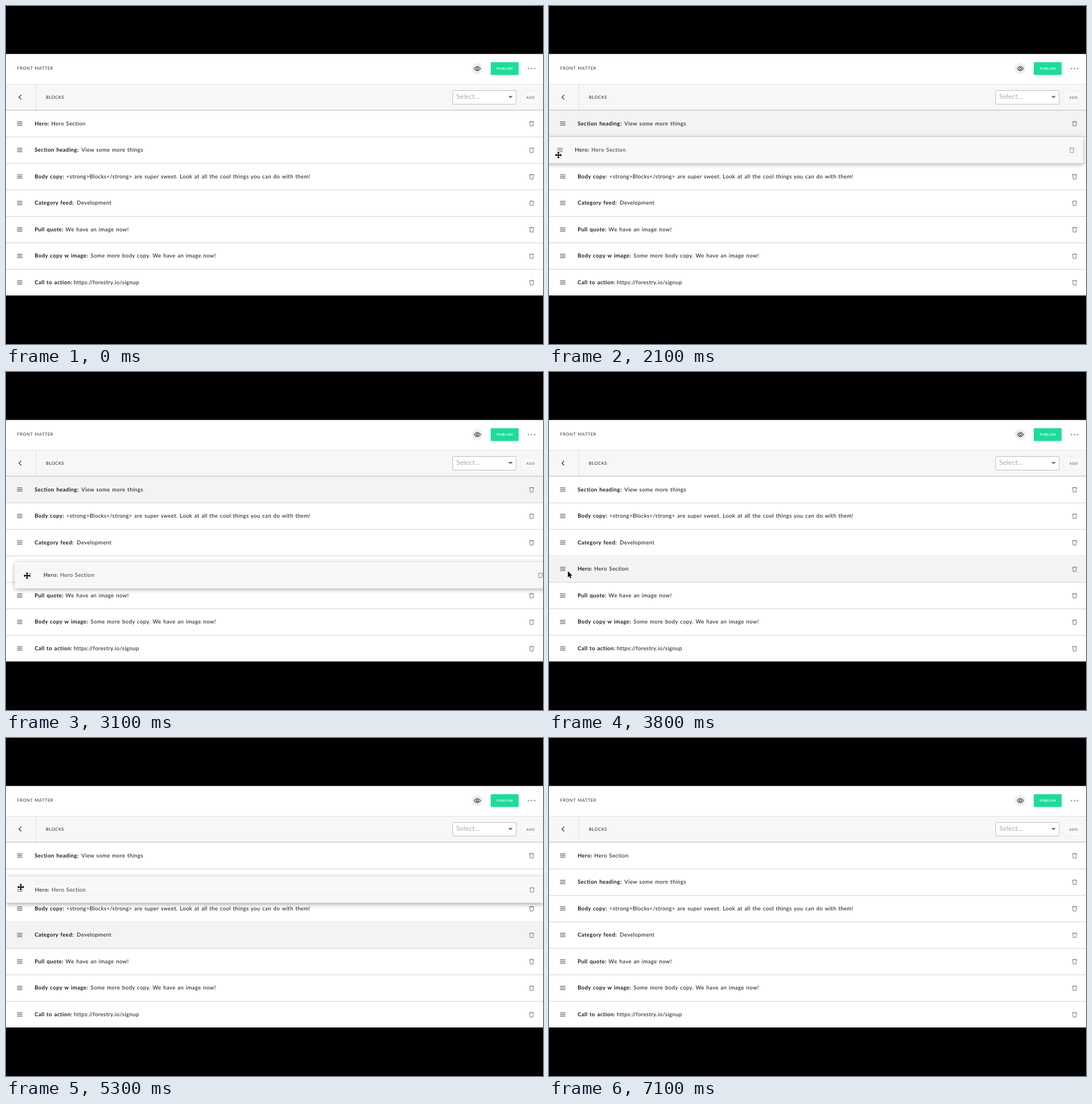
These frames come from a looping animation (943 px wide and 594 px high, 7400 ms). An HTML page with a canvas:

```html
<!DOCTYPE html>
<html lang="en">
<head>
<meta charset="utf-8">
<title>Sortable blocks</title>
<style>
html, body { margin: 0; width: 100%; height: 100%; overflow: hidden; background: #000; }
canvas { display: block; }
</style>
</head>
<body>
<canvas id="stage" width="943" height="594"></canvas>
<script>
const ctx = document.getElementById('stage').getContext('2d');
const W = 943, H = 594, LOOP = 7400, STEP = 100;
const TOP = 183.5, PITCH = 46.55;
const FONT = 'Lato, "Open Sans", sans-serif';

// label, value, x of the value
const hero = ['Hero:', 'Hero Section', 79.5];
const others = [
  ['Section heading:', 'View some more things', 132.3],
  ['Body copy:', '<strong>Blocks</strong> are super sweet. Look at all the cool things you can do with them!', 106],
  ['Category feed:', 'Development', 124.3],
  ['Pull quote:', 'We have an image now!', 104.6],
  ['Body copy w image:', 'Some more body copy. We have an image now!', 148.6],
  ['Call to action:', 'https://forestry.io/signup', 119]
];

// time, x, y
const pointerKeys = [
  [900, -15, 258], [1500, 22, 207], [1900, 22, 207], [2000, 19, 236], [2100, 16.5, 262],
  [2600, 23.5, 308], [3100, 37, 358], [3400, 33, 350], [3900, 33, 350], [4300, 10, 354],
  [4700, 25, 348], [5000, 25, 348], [5300, 26, 262], [5500, 26, 204], [5600, 26, 200],
  [5700, 25.5, 202.5], [5900, 25.5, 202.5], [6300, -18, 214]
];
// time, offset of the lifted row from the first slot
const drags = [
  { from: 1900, to: 3400, hover: 0,
    keys: [[1900, 0, 0], [2000, -3, 21], [2100, -5, 46.5], [2600, 1, 100], [3100, 15.5, 150.5], [3400, 9, 144]] },
  { from: 5000, to: 5900, hover: 3,
    keys: [[5000, 0, 3 * PITCH], [5300, 0.5, 60], [5500, 0, -2], [5600, 0, -8], [5700, -0.5, -10]] }
];

function at(keys, t) {
  const i = keys.findIndex(k => k[0] > t);
  if (i < 0) return keys[keys.length - 1].slice(1);
  if (i === 0) return keys[0].slice(1);
  const a = keys[i - 1], b = keys[i], u = (t - a[0]) / (b[0] - a[0]);
  return [a[1] + (b[1] - a[1]) * u, a[2] + (b[2] - a[2]) * u];
}

function rect(x, y, w, h, color) {
  ctx.fillStyle = color;
  ctx.fillRect(x, y, w, h);
}

function path(points, close) {
  ctx.beginPath();
  points.forEach(([x, y]) => ctx.lineTo(x, y));
  if (close) ctx.closePath();
}

function stroke(color, width) {
  ctx.strokeStyle = color;
  ctx.lineWidth = width;
  ctx.stroke();
}

function disc(x, y, r, color) {
  ctx.beginPath();
  ctx.arc(x, y, r, 0, Math.PI * 2);
  ctx.fillStyle = color;
  ctx.fill();
}

function box(x, y, w, h, r, fill, line) {
  ctx.beginPath();
  ctx.roundRect(x, y, w, h, r);
  ctx.fillStyle = fill;
  ctx.fill();
  stroke(line, 1);
}

function text(str, x, y, size, weight, color, spacing, gap = 0) {
  ctx.font = `${weight} ${size}px ${FONT}`;
  ctx.textRendering = 'geometricPrecision';
  ctx.letterSpacing = spacing + 'px';
  ctx.wordSpacing = gap + 'px';
  ctx.fillStyle = color;
  ctx.fillText(str, x, y);
}

function trash(x, y) {
  path([[x - 4.2, y - 3.3], [x + 4.2, y - 3.3]]);
  stroke('#777', 1.1);
  path([[x - 3.3, y - 3], [x - 2.6, y + 4.2], [x + 2.6, y + 4.2], [x + 3.3, y - 3]]);
  stroke('#777', 1);
  path([[x - 1.5, y - 4.4], [x + 1.5, y - 4.4]]);
  stroke('#999', 0.8);
}

function rowContent([label, value, valueX], y) {
  const mid = y + 23;
  for (const d of [-2.9, 0, 2.9]) rect(19.4, mid + d - 0.6, 9.3, 1.2, '#5a5a5a');
  text(label, 50.2, mid + 3.1, 9.6, 700, '#1c1c1c', 0.4, 0.8);
  text(value, valueX, mid + 3.1, 9.6, 500, '#222', 0.36, 0.8);
  trash(923, mid + 0.3);
}

function listRow(item, slot, hovered, alpha) {
  const y = TOP + slot * PITCH;
  if (hovered) rect(0, y, W, PITCH, '#f3f3f3');
  ctx.globalAlpha = alpha;
  rowContent(item, y);
  ctx.globalAlpha = 1;
  if (slot < 6) rect(0, y + PITCH - 0.7, W, 1.4, '#dcdcdc');
}

function liftedRow(dx, dy) {
  const y = TOP + dy;
  ctx.save();
  ctx.translate(dx, 0);
  ctx.save();
  ctx.beginPath();
  ctx.rect(-40, 0, W + 80, H);
  ctx.rect(0, y, W, PITCH);
  ctx.clip('evenodd');
  ctx.shadowColor = 'rgba(0,0,0,.36)';
  ctx.shadowBlur = 8;
  ctx.shadowOffsetY = 1.5;
  rect(0, y, W, PITCH, '#fff');
  ctx.restore();
  ctx.globalAlpha = 0.82;
  rect(0, y, W, PITCH, '#f7f7f7');
  rowContent(hero, y);
  rect(0, y + PITCH - 1, W, 1, '#dcdcdc');
  ctx.restore();
}

function header() {
  text('FRONT MATTER', 19.5, 112.4, 7.6, 500, '#444', 0.5, 0.6);

  disc(827.5, 110, 9.7, '#eeeeee');
  ctx.beginPath();
  ctx.moveTo(822.2, 110);
  ctx.quadraticCurveTo(827.7, 102.6, 833.2, 110);
  ctx.quadraticCurveTo(827.7, 117.4, 822.2, 110);
  stroke('#333', 1.1);
  ctx.beginPath();
  ctx.arc(827.7, 110, 1.8, 0, Math.PI * 2);
  stroke('#333', 1.1);

  box(851.5, 99, 48.5, 22, 1, '#1fdb98', '#4be2ad');
  text('PUBLISH', 861.7, 112.1, 5.8, 700, '#fff', 0.65);
  for (const x of [917.6, 922.9, 928.2]) disc(x, 110, 1.6, '#a8a8a8');

  rect(0, 137, W, 46, '#f7f7f7');
  rect(0, 137, W, 1, '#e0e0e0');
  rect(52, 138, 1, 45, '#dcdcdc');
  path([[26.8, 156.2], [22.8, 160.2], [26.8, 164.2]]);
  stroke('#222', 1.2);
  text('BLOCKS', 70, 162.9, 7.6, 500, '#333', 0.55);

  box(784.5, 148.5, 111.5, 24, 2, '#fff', '#bdbdbd');
  text('Select...', 790.7, 163.4, 11.5, 400, '#a6a6a6', 0.3);
  path([[882, 158], [889.8, 158], [885.9, 162.3]], true);
  ctx.fillStyle = '#777';
  ctx.fill();
  box(904, 150, 34, 22, 1, '#f9f9f9', '#eeeeee');
  text('ADD', 913.8, 162.9, 6, 700, '#777', 0.6);
  rect(0, 182.4, W, 1.4, '#cbcbcb');
}

function arrow(x, y) {
  path([[0, 0], [0, 11], [2.5, 8.7], [4.3, 12.6], [6.3, 11.7], [4.6, 8], [8, 7.8]]
    .map(([a, b]) => [x + a, y + b]), true);
  stroke('#fff', 1.6);
  ctx.fillStyle = '#111';
  ctx.fill();
}

function moveCross(x, y) {
  const tips = [0, 1, 2, 3].map(q => q * Math.PI / 2);
  const draw = grow => {
    for (const a of tips) {
      ctx.save();
      ctx.translate(x, y);
      ctx.rotate(a);
      path([[0, -0.9], [3.4, -0.9], [3.4, -2.7], [6.1, 0], [3.4, 2.7], [3.4, 0.9], [0, 0.9]], true);
      if (grow) {
        stroke('#fff', 1.8);
      } else {
        ctx.fillStyle = '#111';
        ctx.fill();
      }
      ctx.restore();
    }
  };
  draw(true);
  draw(false);
}

function draw(t) {
  const drag = drags.find(d => t >= d.from && t < d.to);
  const [px, py] = at(pointerKeys, t);
  const visible = t > 900 && t < 6300;
  const offset = drag && at(drag.keys, t);

  let slot = t >= drags[0].to && t < drags[1].from ? 3 : 0;
  if (drag) slot = Math.max(0, Math.min(3, Math.round(offset[1] / PITCH)));

  let hover = -1;
  if (drag) hover = drag.hover;
  else if (visible && px > 0) hover = Math.floor((py - TOP) / PITCH);

  rect(0, 0, W, H, '#000');
  rect(0, 84.3, W, 424.4, '#fff');
  const items = others.slice();
  items.splice(slot, 0, hero);
  items.forEach((item, i) => {
    const ghost = drag && item === hero;
    listRow(item, i, i === hover && !ghost, ghost ? 0.2 : 1);
  });
  header();
  if (drag) liftedRow(...offset);
  if (visible) (drag ? moveCross : arrow)(px, py);
}

function frame(now) {
  draw(Math.floor((now % LOOP) / STEP) * STEP);
  requestAnimationFrame(frame);
}
draw(0);
requestAnimationFrame(frame);
</script>
</body>
</html>
```
